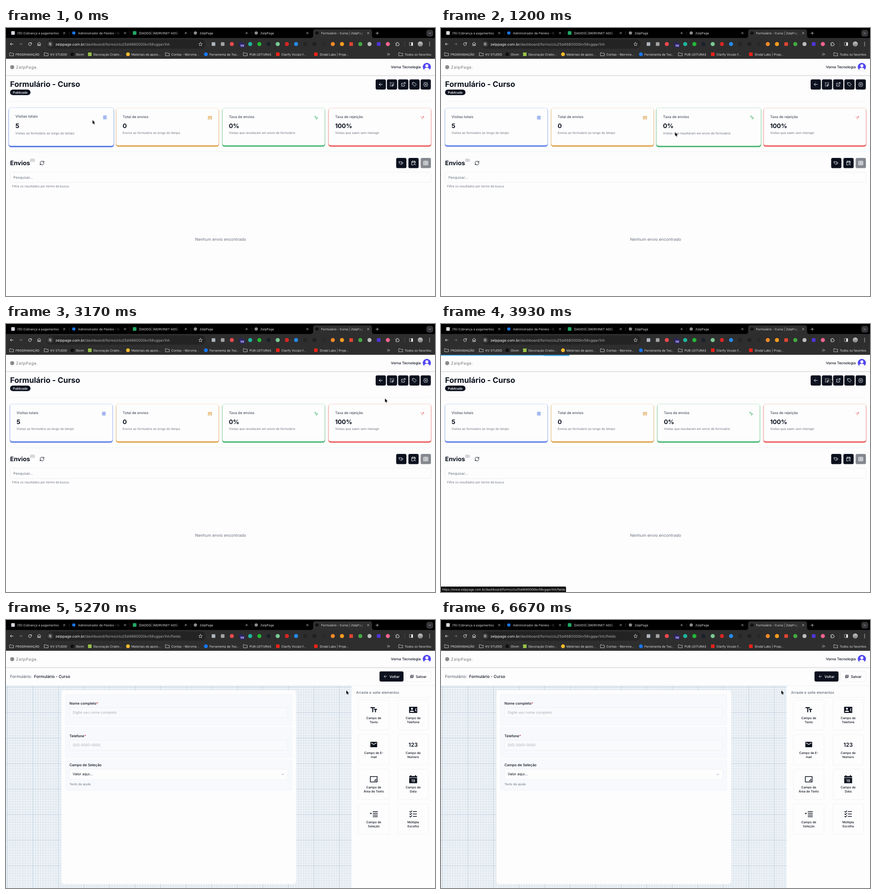
An HTML page that plays this animation: 947x592 px, repeating every 6.71 s.

```html
<!DOCTYPE html>
<html lang="pt-BR">
<head>
<meta charset="utf-8">
<title>Formulário - Curso</title>
<style>
html, body { margin: 0; width: 100%; height: 100%; overflow: hidden; background: #fdfdfd; }
svg { display: block; width: 947px; height: 592px; font-family: Inter, Roboto, sans-serif; }
text { white-space: pre; text-rendering: geometricPrecision; }
.card { transform-box: fill-box; transform-origin: center; }
.card, #dash, #load, #edit, #status, #bar, #cursor, #path { animation: 6710ms linear infinite; }
#dash { animation-name: dash; animation-timing-function: step-end; }
#load { animation-name: load; animation-timing-function: step-end; }
#edit { animation-name: edit; animation-timing-function: step-end; }
#status { animation-name: status; animation-timing-function: step-end; }
#path { animation-name: path; animation-timing-function: step-end; }
#bar { animation-name: bar; }
#cursor { animation-name: cursor; }
#card0 { animation-name: card0; }
#card1 { animation-name: card1; }
#card2 { animation-name: card2; }
#card3 { animation-name: card3; }
.spin { animation: spin 838.75ms linear infinite; }
.spin.fast { animation-duration: 419.375ms; }
@keyframes dash { 0% { visibility: visible } 59.02%, 100% { visibility: hidden } }
@keyframes load { 0% { visibility: hidden } 59.02% { visibility: visible } 72.43%, 100% { visibility: hidden } }
@keyframes edit { 0% { visibility: hidden } 72.43%, 100% { visibility: visible } }
@keyframes status { 0% { visibility: hidden } 53.06% { visibility: visible } 71.6%, 100% { visibility: hidden } }
@keyframes path { 0% { fill: transparent } 59.02%, 100% { fill: #a8a8a8 } }
@keyframes bar {
  0%, 56% { transform: translateX(-947px); opacity: 0 }
  56.1% { transform: translateX(-871px); opacity: 1 }
  62% { transform: translateX(-379px) }
  67% { transform: translateX(-189px) }
  71% { transform: translateX(-161px) }
  72.5% { transform: none; opacity: 1 }
  75%, 100% { transform: none; opacity: 0 }
}
@keyframes cursor {
  0%, 2.2% { transform: translate(191px, 203.5px) }
  17.88% { transform: translate(516.5px, 230.5px) }
  33.83% { transform: translate(816.5px, 176.5px); animation-timing-function: ease-out }
  47.24% { transform: translate(836.5px, 164.5px); animation-timing-function: ease-in-out }
  56%, 71% { transform: translate(859.7px, 121.2px); animation-timing-function: ease-in-out }
  77.8%, 100% { transform: translate(751.2px, 155.5px) }
}
@keyframes card0 { 0%, 4.4% { transform: scale(1.025) } 6.6%, 100% { transform: none } }
@keyframes card1 { 0%, 4.7% { transform: none } 6.9%, 15.5% { transform: scale(1.025) } 17.7%, 100% { transform: none } }
@keyframes card2 { 0%, 16% { transform: none } 18.3%, 27.8% { transform: scale(1.025) } 30%, 100% { transform: none } }
@keyframes card3 { 0%, 28.3% { transform: none } 30.5%, 32.9% { transform: scale(1.025) } 35.2%, 100% { transform: none } }
@keyframes spin { to { transform: rotate(360deg) } }
</style>
</head>
<body>
<svg id="stage" viewBox="0 0 947 592"></svg>
<script>
const INK = '#0b111e', GREY = '#6b7280', CHROME = '#2e2e2e', XS = 6.76, SM = 7.9, BASE = 9;

const text = (x, y, s, size = XS, fill = INK, weight = 400, anchor = 'start', more = '') =>
  `<text x="${x}" y="${y}" font-size="${size}" fill="${fill}" font-weight="${weight}" text-anchor="${anchor}" ${more}>${s}</text>`;
const rect = (x, y, w, h, fill, rx = 0, stroke = 'none', more = '') =>
  `<rect x="${x}" y="${y}" width="${w}" height="${h}" fill="${fill}" rx="${rx}" stroke="${stroke}" stroke-width=".6" ${more}/>`;
const dot = (x, y, r, fill) => `<circle cx="${x}" cy="${y}" r="${r}" fill="${fill}"/>`;
const line = (x1, y, x2, color = '#e9eaef') =>
  `<path d="M${x1} ${y}H${x2}" stroke="${color}" stroke-width=".7"/>`;

// Icons are drawn on a 24 unit grid and centred on x, y.
const at = (x, y, size) => `translate(${x - size / 2} ${y - size / 2}) scale(${size / 24})`;
const icon = (x, y, size, d, color, w = 2) =>
  `<path transform="${at(x, y, size)}" d="${d}" fill="none" stroke="${color}" stroke-width="${w}" stroke-linecap="round" stroke-linejoin="round"/>`;
const solid = (x, y, size, d, color = INK) =>
  `<path transform="${at(x, y, size)}" d="${d}" fill="${color}" fill-rule="evenodd"/>`;

const P = {
  back: 'M20 12H4M11 19l-7-7 7-7',
  forward: 'M4 12h16M13 5l7 7-7 7',
  pick: 'M4 4h3M10.5 4h3M17 4h3v3M20 10.5v2M4 4v3M4 10.5v3M4 17v3h3M10.5 20h2M12 12l9 3-4 2-2 4z',
  open: 'M18 13v7H4V6h7M15 3h6v6M10 14L21 3',
  tag: 'M3 3h9l9 9-8 9L3 12zM7.5 7.5h.01',
  gear: 'M12 2l3 2h4l1 4 2 4-2 4-1 4h-4l-3 2-3-2H5l-1-4-2-4 2-4 1-4h4zM15 12a3 3 0 1 1-6 0 3 3 0 1 1 6 0',
  refresh: 'M3 12a9 9 0 0 1 15-6.7L21 8M21 3v5h-5M21 12a9 9 0 0 1-15 6.7L3 16M3 21v-5h5',
  tags: 'M2 5h7l7 7-7 7-7-7zM13 5l8 7-8 7M6 9h.01',
  dates: 'M21 11V4H3v17h8M3 9h18M8 1v5M16 1v5M17 14a3 3 0 1 0 .01 0M20 20l2 2',
  sheet: 'M2 3h20v18H2zM2 9h20M2 15h20M9 3v18M15 3v18',
  folder: 'M2 4h7l3 3h10v13H2z',
  close: 'M5 5l14 14M19 5L5 19',
  down: 'M5 9l7 7 7-7',
  more: 'M4 5l7 7-7 7M13 5l7 7-7 7',
  star: 'M12 2l3 7 7 .6-5.4 5 1.7 7.4L12 18l-6.3 4 1.7-7.4L2 9.6 9 9z',
  home: 'M3 11l9-8 9 8M5 10v11h5v-7h4v7h5V10',
  reload: 'M20 12a8 8 0 1 1-3-6.2L20 8M20 3v5h-5',
  tune: 'M3 7h5M14 7h7M8 7a3 3 0 1 0 6 0 3 3 0 1 0-6 0M3 17h8M17 17h4M11 17a3 3 0 1 0 6 0 3 3 0 1 0-6 0',
  puzzle: 'M4 7h5V5a2 2 0 0 1 5 0v2h5v5h1a2 2 0 0 1 0 5h-1v4H4v-5h2a2 2 0 0 0 0-4H4z',
  copy: 'M8 4h13v12H8zM8 8H3v12h13v-4M14 7v6M11 10h6',
  visits: 'M3 7V3h18v4M3 17v4h18v-4M2 12c5-7 15-7 20 0-5 7-15 7-20 0M15 12a3 3 0 1 1-6 0 3 3 0 1 1 6 0',
  form: 'M2 4h20v17H2zM2 8h20M5 12h7M5 16h7M16 12h3M16 16h3',
  click: 'M9 9l13 5-6 2-2 6zM7 2v3M2 7h3M3 3l2 2M12 4l-2 2',
  bounce: 'M2 5l9 9 9-9M13 5h7v7M11 14v7'
};

function browser() {
  let s = rect(0, 0, 947, 24, '#000') + rect(0, 22, 947, 46, CHROME);
  s += `<path d="M673 22q5 0 5-5V8q0-5 5-5h120q5 0 5 5v9q0 5 5 5z" fill="${CHROME}"/>`;
  const tabs = [
    ['(15) Cobrança e pagamentos', '#d5d8de'], ['Administrador de Painéis - G', '#1877f2'],
    ['[DADOS] [MORVINET ADS] -', '#23a566'], ['ZelpPage', '#8d8d8d'], ['ZelpPage', '#8d8d8d'],
    ['Formulário - Curso | ZelpPag', '#111']
  ];
  tabs.forEach(([title, color], i) => {
    const x = 15.5 + i * 134.2, active = i === 5;
    s += i < 3 && i !== 1 ? rect(x - 4, 7, 8, 8, color, 1) : dot(x, 11, 3.6, color);
    s += text(x + 9.3, 13.6, title, XS, '#dedede');
    if (title.length > 20 && i) s += rect(x + 89, 4, 19, 15, `url(#fade${active ? 1 : 0})`);
    s += icon(x + 113, 11.3, 6.5, P.close, '#e2e2e2', 3);
    if (i < 4) s += rect(x + 123.5, 7.5, 0.7, 8, '#3c3c3c');
  });
  s += icon(819.5, 11.5, 8, 'M12 3v18M3 12h18', '#ddd', 2.5);
  s += rect(928, 4, 15, 15, '#35363a', 5) + icon(935.5, 11.5, 6.5, P.down, '#eee', 3);

  s += icon(12.5, 35.5, 9, P.back, '#eee', 2.5) + icon(32.5, 35.5, 9, P.forward, '#777', 2.5);
  s += icon(53, 35.5, 9.5, P.reload, '#eee', 2.5) + icon(73, 35.3, 10, P.home, '#eee', 2.2);
  s += rect(89, 25.5, 351.5, 20, '#232323', 10) + dot(97.5, 35.5, 7.2, '#363636');
  s += icon(97.5, 35.5, 8, P.tune, '#eee', 2.4) + icon(429.5, 35.5, 9.5, P.star, '#ddd', 2);
  s += text(109, 38.5, 'zelppage.com.br<tspan fill="#a8a8a8">/dashboard/forms/clu25d4680000kn58vgqav1nh</tspan><tspan id="path">/fields</tspan>', 8.1, '#f2f2f2');

  const tools = ['#aeb4bc', '#a4a4a4', '#e9474d', '#26205f', '#20b59c', '#22b835', '#19202b', '#7bc894', '#d52525', '#2589e8',
    '#252525', '#202020', '#292929', '#ee8a27', '#f39b20', '#e04631', '#43a943', '#bcbcbc', '#5334dc', '#ef648f'];
  tools.forEach((color, i) => {
    const x = 458 + i * 20.26;
    s += [0, 1, 6, 10, 15, 18].includes(i) ? rect(x - 4, 31.5, 8, 8, color, 1) : dot(x, 35.5, 4.5, color);
  });
  s += rect(516, 34.5, 11, 8.5, '#30277c', 2) + text(521.5, 41, '58', 5.8, '#fff', 600, 'middle');
  s += icon(864, 35.3, 10, P.puzzle, '#eee', 2.2) + rect(880, 30, 0.7, 11, '#555');
  s += rect(890.5, 32, 7.5, 7, 'none', 0.5, '#eee') + rect(894.5, 32, 3.5, 7, '#eee');
  s += dot(914.5, 35.5, 5.7, 'url(#photo)');
  [31.8, 35.5, 39.2].forEach(y => s += dot(935, y, 0.9, '#eee'));

  const marks = [
    [8, 21, 'PROGRAMAÇÃO'], [84.5, 98, 'KV STUDIO'], [142, 154, 'Olvim', '#111'],
    [181, 193, 'Decoração Criativ...', '#95bf47'], [265, 277, 'Materiais de apoio...', '#f2b92b'],
    [352, 365, 'Contas - Morvine...'], [437, 449, 'Ferramenta de Tes...', '#1877f2'],
    [524, 537.5, 'PUB LEITURAS'], [596, 608, 'Clarify Vocals f...', '#e52319'],
    [680, 692.5, 'Ondal Labs | Proje...', '#e52319'], [867, 880, 'Todos os favoritos']
  ];
  marks.forEach(([x, tx, label, color], i) => {
    s += !color ? icon(x + 4.5, 58, 10, P.folder, '#ddd', 2)
      : i > 7 || i === 3 ? rect(x, 54, 8, 8, color, 1) : dot(x + 4.3, 58, 4.3, color);
    s += text(tx, 60.5, label, XS, '#e4e4e4');
  });
  return s + icon(844.5, 58, 8, P.more, '#eee', 2.5);
}

function header() {
  return rect(-4, 60, 955, 44, '#fdfdfd', 0, 'none', 'style="filter:drop-shadow(0 1px 1.5px #0003)"') +
    dot(13.7, 86.5, 4.5, '#8b8b8b') +
    text(22, 89.8, 'ZelpPage.', BASE, '#868686', 500, 'start', 'letter-spacing=".65"') +
    text(915.5, 89, 'Vorna Tecnologia', SM, INK, 500, 'end') +
    dot(929, 86, 9, '#5145f0') + dot(929, 83.6, 3.3, '#fff') +
    '<path d="M923 92.7c0-6.500 12-6.500 12 0a9 9 0 0 1-12 0" fill="#fff"/>';
}

function darkButton(x, y, d, fill = INK) {
  return rect(x, y, 22.6, 22.6, fill, 3.4) + icon(x + 11.3, y + 11.3, 11, d, '#fff', 2);
}

function dashboard() {
  let s = text(9, 130, 'Formulário - Curso', 16.9, INK, 700);
  s += rect(9, 136, 45, 12.3, INK, 6.2) + text(31.5, 144.5, 'Publicado', XS, '#fff', 600, 'middle');
  [P.back, P.pick, P.open, P.tag, P.gear].forEach((d, i) => s += darkButton(816 + i * 24.8, 113.4, d));
  s += line(9, 162, 938) + line(9, 273.3, 938);

  const cards = [
    ['Visitas totais', '5', 'Visitas ao formulário ao longo do tempo', '#4169e1', P.visits],
    ['Total de envios', '0', 'Envios ao formulário ao longo do tempo', '#d9922e', P.form],
    ['Taxa de envios', '0%', 'Visitas que resultaram em envio de formulário', '#27a957', P.click],
    ['Taxa de rejeição', '100%', 'Visitas que saem sem interagir', '#e6403f', P.bounce]
  ];
  cards.forEach(([title, value, note, color, d], i) => {
    const x = 9 + i * 234.4;
    s += `<g class="card" id="card${i}">` +
      rect(x, 177.2, 226, 83.3, color, 4.5, 'none', `transform="translate(0 1.1)" style="filter:drop-shadow(0 .4px .8px ${color})"`) +
      rect(x, 177, 226, 82.6, '#fdfdfd', 4.5, color, 'stroke-opacity=".3"') +
      text(x + 14.2, 199, title, SM, '#4b5563', 500) +
      text(x + 14.2, 220.8, value, 13.5, INK, 700) +
      text(x + 14.2, 234.3, note, XS, GREY) +
      icon(x + 207, 198, 9, d, color, 2) + '</g>';
  });

  s += text(9, 303, 'Envios', 13.5, INK, 700) + text(53.2, 294.5, '(0)', SM, GREY);
  s += icon(79.5, 298.3, 11.3, P.refresh, INK, 2);
  s += darkButton(861.3, 287, P.tags) + darkButton(888.3, 287, P.dates) + darkButton(915.4, 287, P.sheet, '#85888f');
  s += rect(9, 318.6, 929, 22.4, '#fdfdfd', 3.4, '#e3e6ef') + text(16.2, 332.6, 'Pesquisar...', SM, GREY);
  s += text(13.5, 352, 'Filtre os resultados por termo de busca.', XS, GREY);
  return s + text(473.5, 469.7, 'Nenhum envio encontrado', BASE, GREY, 400, 'middle');
}

function loader() {
  return '<g transform="translate(473.4 348) rotate(-95)"><path class="spin" d="M8.46 0A8.46 8.46 0 1 1 2.61-8.05" ' +
    `fill="none" stroke="${INK}" stroke-width="1.9" stroke-linecap="round"/></g>` +
    '<g transform="translate(933.4 81.5) rotate(160)"><path class="spin fast" d="M-3.2 3.2A4.5 4.5 0 0 1 3.2-3.2" ' +
    'fill="none" stroke="#29d" stroke-width="1.1"/></g>';
}

function progress() {
  return rect(0, 68, 947, 1.7, '#29d') +
    rect(891, 68, 56, 1.7, '#29d', 0, 'none', 'style="filter:drop-shadow(0 0 1.5px #29d)"');
}

function field(y, label, value, select) {
  const shift = select ? -8 : 0, star = select ? '' : '<tspan fill="#dc3545">*</tspan>';
  return rect(131.5, y, 499.5, 67.4, '#f7f9fc', 3.4, '#edf0f6') +
    text(140, y + 22.3 + shift, label + star, SM, INK, 500) +
    rect(140, y + 28.5 + shift, 482, 22.4, select ? '#fdfdfd' : '#f9fafc', 3.4, '#e6e9f0') +
    text(147.2, y + 42.2 + shift, value, SM, select ? INK : '#a7adb8');
}

function tileIcon(i, x, y) {
  const lines = 'M10 5h13M10 10h13M10 15h13M10 20h13';
  return [
    () => solid(x, y, 18, 'M2.5 4v3h5v12h3V7h5V4zM21.5 9h-9v3h3v7h3v-7h3z'),
    () => solid(x, y, 18, 'M0 3h24v18H0zM8.5 6a3 3 0 1 0 .01 0zM2.5 18h12c0-5-12-5-12 0zM22 8h-3q-2 4 0 8h3l-1-2h-1v-4h1z'),
    () => solid(x, y, 18, 'M2 4h20v16H2zM20 8l-8 5-8-5V6l8 5 8-5z'),
    () => text(x, y + 4.6, '123', 12.2, INK, 600, 'middle'),
    () => icon(x, y, 18, 'M2 4h20v16H2zM14 17l5-5M18 17l1-1', INK, 2),
    () => solid(x, y, 19, 'M1 3h3V1h3v2h10V1h3v2h3v20H1zM1 7h22v1H1z') + text(x, y + 6, '19', 8.2, '#fff', 500, 'middle'),
    () => solid(x, y, 18, 'M0 9h7l-3.5 4z') + icon(x, y, 18, lines, INK, 2),
    () => icon(x, y, 18, 'M2 5l2 2 4-4M2 12l2 2 4-4M2 19l2 2 4-4M12 5h10M12 12h10M12 19h10', INK, 2.2)
  ][i]();
}

function editor() {
  let s = text(9, 127.8, 'Formulário:', BASE, '#4b5563') + text(62, 127.8, 'Formulário - Curso', 8.9, INK, 500);
  s += rect(824.5, 113.4, 53, 22.6, INK, 3.4) + icon(837.5, 124.8, 9, P.back, '#fff', 2) + text(846.5, 127.7, 'Voltar', SM, '#fff', 500);
  s += rect(882.2, 113.4, 55.8, 22.6, '#fdfdfd', 3.4, '#e8eaf0') + icon(896, 124.8, 9, P.copy, INK, 2.2) + text(904.7, 127.7, 'Salvar', SM, INK, 500);
  s += rect(0, 145, 763, 447, '#eef3f7') + rect(0, 145, 763, 447, 'url(#grid)') + line(0, 145, 947, '#e3e7ed');
  s += rect(122.3, 155, 518.2, 428, '#fdfdfd', 5);
  s += field(165, 'Nome completo', 'Digite seu nome completo');
  s += field(236.8, 'Telefone', '(00) 0000-0000');
  s += field(309, 'Campo de Seleção', 'Valor aqui...', true);
  s += icon(611, 341, 7.5, P.down, '#555d6b', 2) + text(140, 364.6, 'Texto de ajuda', XS, GREY);
  s += text(772.7, 163.3, 'Arraste e solte elementos', SM, '#4b5563') + line(772.7, 171, 938);
  const tiles = ['Campo de|Texto', 'Campo de|Telefone', 'Campo de E-|mail', 'Campo de|Número',
    'Campo de|Área de Texto', 'Campo de|Data', 'Campo de|Seleção', 'Múltipla|Escolha'];
  tiles.forEach((label, i) => {
    const x = 778 + (i % 2) * 87, y = 176.2 + (i >> 1) * 76.7, [a, b] = label.split('|');
    s += rect(x, y, 67.6, 67.2, '#fdfdfd', 3.4, '#e8eaf0') + tileIcon(i, x + 33.8, y + 22.2);
    s += text(x + 33.8, y + 42.7, a, XS, INK, 500, 'middle') + text(x + 33.8, y + 51.7, b, XS, INK, 500, 'middle');
  });
  return s;
}

// The heavy grid lines sit half a cell in from the canvas corner.
function defs() {
  const cell = 5.637, tile = cell * 10;
  let fine = '';
  for (let i = 0.55; i < 10; i++) fine += `M${i * cell} 0v${tile}M0 ${i * cell}h${tile}`;
  const heavy = `M${0.55 * cell} 0v${tile}M0 ${0.55 * cell}h${tile}`;
  const fade = (id, c) => `<linearGradient id="${id}"><stop stop-color="${c}" stop-opacity="0"/><stop offset=".8" stop-color="${c}"/></linearGradient>`;
  return `<defs><pattern id="grid" y="145" width="${tile}" height="${tile}" patternUnits="userSpaceOnUse">
    <path d="${fine}" stroke="#cad8e4" stroke-width=".56"/>
    <path d="${heavy}" stroke="#b3c6d8" stroke-width=".7"/></pattern>
    <linearGradient id="photo" x2="0" y2="1"><stop stop-color="#c9c9c9"/><stop offset="1" stop-color="#777"/></linearGradient>
    ${fade('fade0', '#000')}${fade('fade1', CHROME)}</defs>`;
}

const group = (id, s) => `<g id="${id}">${s}</g>`;
document.getElementById('stage').innerHTML = defs() + rect(0, 0, 947, 592, '#fdfdfd') +
  group('dash', dashboard()) + group('edit', editor()) + header() + group('load', loader()) +
  group('bar', progress()) + browser() +
  group('status', rect(-4, 580, 280, 16, '#0b0b0b', 2) +
    text(2.7, 588.6, 'https://www.zelppage.com.br/dashboard/forms/clu25d4680000kn58vgqav1nh/fields', XS, '#eee')) +
  group('cursor', '<path d="M0 0v8.2l1.9-1.7 1.3 2.9 1.4-.6-1.3-2.9h2.5z" fill="#000" stroke="#fff" stroke-width=".7" paint-order="stroke"/>');
</script>
</body>
</html>
```
